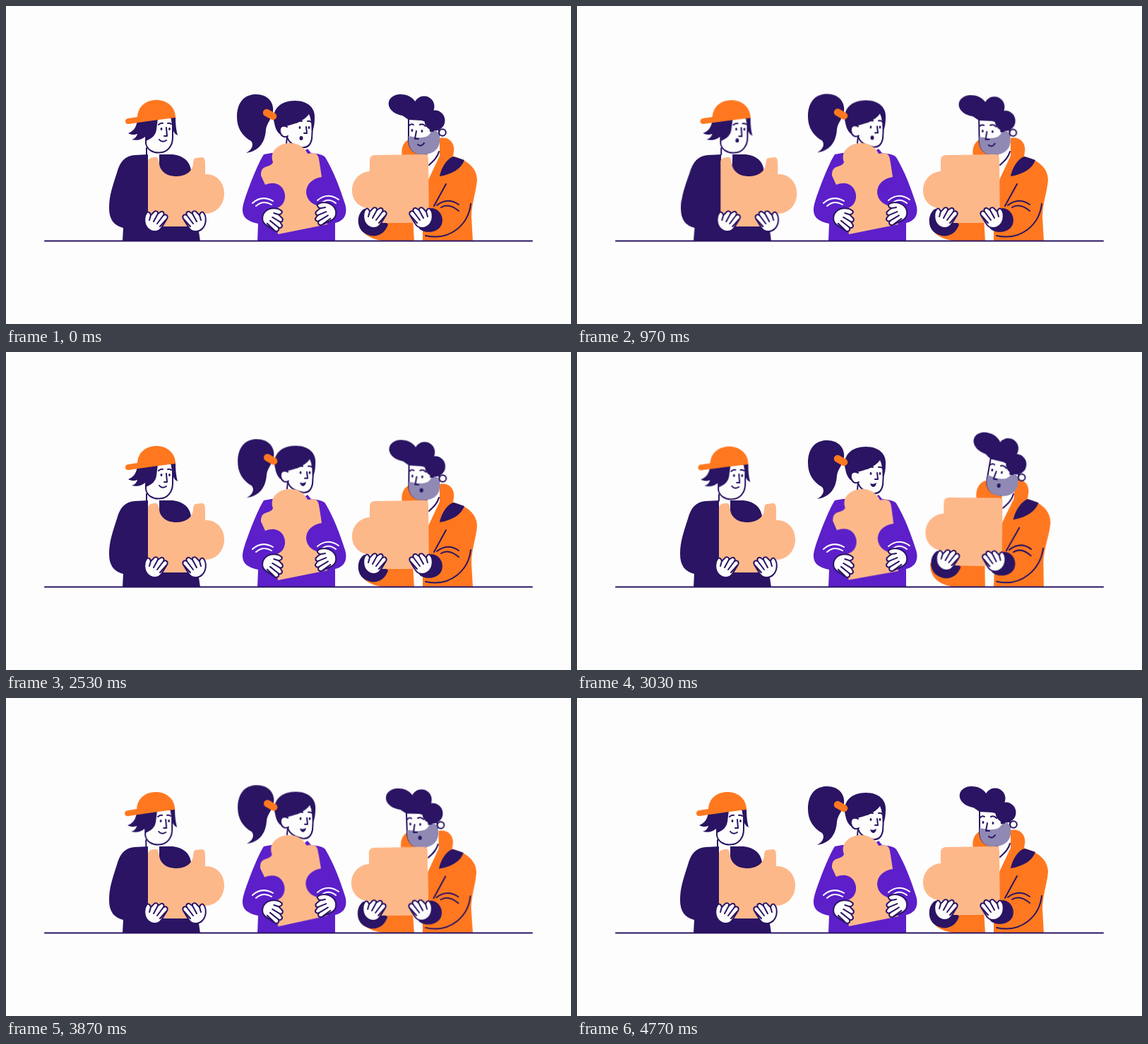
Write an HTML page that moves like this. It is 800 px wide and 450 px high and loops after 4810 ms.

```html
<!DOCTYPE html>
<html lang="en">
<head>
<meta charset="utf-8">
<title>Three people with puzzle pieces</title>
<style>
html, body { margin: 0; width: 100%; height: 100%; overflow: hidden; background: #fdfdfd; }
svg { display: block; width: 100vw; height: 100vh; }
.navy { fill: #2a1463; }
.orange { fill: #ff7820; }
.piece { fill: #fdb88a; }
.purple { fill: #5c1fca; }
.beard { fill: #8f89b4; }
.skin { fill: #fdfdfd; }
.ink, .edge { stroke: #2a1463; stroke-width: 2; stroke-linecap: round; stroke-linejoin: round; }
.ink { fill: none; }
.edge { fill: #fdfdfd; }
.fold { fill: none; stroke: #fdfdfd; stroke-width: 2; stroke-linecap: round; }

.anim { transform-box: view-box; animation: 4810ms ease-in-out infinite; }
.talk, .rest { animation: 4810ms step-end infinite; }

#boyBody { transform-origin: 220px 332px; animation-name: boyBody; }
#boyPiece { animation-name: boyPiece; }
#boyHead { transform-origin: 217px 208px; animation-name: boyHead; }
@keyframes boyBody {
  0%, 6%, 50%, 100% { transform: skewX(0deg); }
  15%, 24% { transform: skewX(-1.5deg); }
  38% { transform: skewX(-.8deg); }
}
@keyframes boyPiece {
  0%, 6%, 50%, 100% { transform: translate(0, 0); }
  15%, 24% { transform: translate(2.3px, 0); }
  38% { transform: translate(1.2px, 0); }
}
@keyframes boyHead {
  0%, 5%, 51%, 56%, 100% { transform: translate(0, 0) rotate(0deg); }
  14%, 24% { transform: translate(5.2px, .3px) rotate(.5deg); }
  38% { transform: translate(2.5px, .2px) rotate(.4deg); }
  61%, 66% { transform: translate(2px, .8px) rotate(.6deg); }
  80%, 84% { transform: translate(-.7px, 0) rotate(-.2deg); }
}

#girlHead { transform-origin: 405px 205px; animation-name: girlHead; }
#girlPiece { transform-origin: 405px 300px; animation-name: girlPiece; }
@keyframes girlHead {
  0%, 63%, 99%, 100% { transform: translate(0, 0) rotate(0deg); }
  8%, 13% { transform: translate(.3px, -2.5px) rotate(.2deg); }
  20%, 38% { transform: translate(0, -.6px) rotate(0deg); }
  52.6%, 80.5% { transform: translate(.9px, -1.4px) rotate(.3deg); }
  92% { transform: translate(.4px, -2px) rotate(.2deg); }
}
@keyframes girlPiece {
  0%, 52%, 99%, 100% { transform: rotate(0deg); }
  63%, 70% { transform: rotate(1.2deg); }
  80.5% { transform: rotate(-1deg); }
}

#manBody { transform-origin: 580px 332px; animation-name: manBody; }
#manPiece { transform-origin: 550px 260px; animation-name: manPiece; }
#manHead { transform-origin: 600px 205px; animation-name: manHead; }
@keyframes manBody {
  0%, 53%, 99%, 100% { transform: skewX(0deg) scaleY(1); }
  57.500%, 63% { transform: skewX(-2.2deg) scaleY(1.04); }
  69%, 75.500% { transform: skewX(-3.2deg) scaleY(1.045); }
  80.5% { transform: skewX(.6deg) scaleY(.992); }
  86%, 92% { transform: skewX(-1.1deg) scaleY(1.018); }
}
@keyframes manPiece {
  0%, 53%, 99%, 100% { transform: translate(0, 0) rotate(0deg); }
  57.500%, 63% { transform: translate(3.5px, -4.500px) rotate(1.3deg); }
  69%, 75.500% { transform: translate(4.8px, -5px) rotate(1.6deg); }
  80.5% { transform: translate(-1px, .8px) rotate(-.2deg); }
  86%, 92% { transform: translate(1.6px, -2px) rotate(.5deg); }
}
@keyframes manHead {
  0%, 4%, 99%, 100% { transform: translate(0, 0) rotate(0deg); }
  20% { transform: translate(-.2px, .6px) rotate(-.8deg); }
  38% { transform: translate(-.1px, .3px) rotate(-.5deg); }
  53% { transform: translate(.2px, -.2px) rotate(.5deg); }
  57.500%, 63% { transform: translate(7.5px, -5px) rotate(10deg); }
  69%, 75.500% { transform: translate(9px, -6px) rotate(11deg); }
  80.5% { transform: translate(-1.5px, 1.5px) rotate(-2deg); }
  86%, 92% { transform: translate(3px, -2.500px) rotate(4deg); }
}

#boyHead .talk { animation-name: boyTalk; }
#boyHead .rest { animation-name: boyRest; }
#girlHead .talk { animation-name: girlTalk; }
#girlHead .rest { animation-name: girlRest; }
#manHead .talk { animation-name: manTalk; }
#manHead .rest { animation-name: manRest; }
@keyframes boyTalk { 0%, 45% { opacity: 0; } 12% { opacity: 1; } }
@keyframes boyRest { 0%, 45% { opacity: 1; } 12% { opacity: 0; } }
@keyframes girlTalk { 0% { opacity: 1; } 30% { opacity: 0; } 99.6% { opacity: 1; } }
@keyframes girlRest { 0% { opacity: 0; } 30% { opacity: 1; } 99.6% { opacity: 0; } }
@keyframes manTalk { 0%, 93% { opacity: 0; } 49% { opacity: 1; } }
@keyframes manRest { 0%, 93% { opacity: 1; } 49% { opacity: 0; } }
</style>
</head>
<body>
<svg viewBox="0 0 800 450" preserveAspectRatio="none">
  <defs>
    <g id="hand">
      <path class="edge" d="M-12 11C-18 5 -18 -6 -14 -11C-12 -14 -9 -12 -8 -8L-4 -12C-2 -15 3 -14 2 -10L5 -12C8 -15 12 -12 10 -8C14 -10 17 -7 15 -3L7 10C2 17 -7 16 -12 11Z"/>
      <path class="ink" d="M-8 -8L-10 -1M2 -10L-4 1M10 -8L1 4M14 -2L5 8"/>
    </g>
    <clipPath id="above"><path d="M0 0H800V332H0Z"/></clipPath>
  </defs>

  <g clip-path="url(#above)">
    <!-- boy -->
    <g id="boyBody" class="anim">
      <path class="navy" d="M202 210L182 211C168 212 161 221 157 236C151 255 146 268 146 286C146 302 153 311 166 314L165 333H275L272 312L262 300V232C260 220 252 212 236 210Z"/>
      <path class="skin" d="M201 202H217V224H201Z"/>
    </g>
    <g id="boyHead" class="anim">
      <path class="edge" d="M198 178V194C199 203 208 208 217 207.500C229 207 236 198 236 186V158H200Z"/>
      <path class="ink" d="M199 201V210"/>
      <path class="navy" d="M186 161C185 171 181 177 173 180C178 183 183 182 186 181C185 185 182 188 178 189C186 191 192 189 197 185L198 191C206 188 212 183 213 175L215 159Z"/>
      <path class="navy" d="M233 156H240C240 168 241 176 243 183C238 181 236 176 235 168Z"/>
      <path class="orange" d="M173 159L186 157C187 142 198 133 213 133C228 133 240 143 240 158C222 160 200 163 174 167C168 168 167 160 173 159Z"/>
      <path class="ink" d="M216 168Q219 165 222 166M229 166Q232 165 234 167M227 172L228 184H224"/>
      <ellipse class="navy" cx="220" cy="174" rx="1.400" ry="1.900"/>
      <ellipse class="navy" cx="231.500" cy="174" rx="1.400" ry="1.900"/>
      <path class="ink rest" d="M217 189Q221 194 227 190"/>
      <ellipse class="navy talk" cx="221.500" cy="190" rx="2.500" ry="3"/>
    </g>
    <g id="boyPiece" class="anim">
      <path class="piece" d="M201 221C201 215 206 214 213 214C217 215 216 224 219 230C224 239 234 241 242 241C252 241 261 236 264 228C266 222 264 216 269 215L278 214C282 215 282 220 282 224V238C297 237 309 249 309 265C309 282 297 294 282 294V300C282 307 279 312 272 312H201Z"/>
      <use href="#hand" transform="translate(213 304)"/>
      <use href="#hand" transform="translate(266 304) scale(-1 1)"/>
    </g>

    <!-- girl -->
    <path class="purple" d="M376 208L365 210C357 222 344 255 337 277C331 296 338 304 357 308L356 333H466V307C480 304 484 293 480 280C473 258 464 234 452 214C447 209 438 209 432 208L427 202L421 206Z"/>
    <path class="skin" d="M391 186H424V204L414 212H392Z"/>
    <g id="girlHead" class="anim">
      <path class="navy" d="M352 125C370 124 380 136 378 150C376 160 369 166 368 175C367 191 360 205 340 208C349 203 351 196 347 191C334 184 327 172 327 157C327 138 336 126 352 125Z"/>
      <path class="edge" d="M392 166L430 150C434 162 434 178 433 188C431 198 426 201 419 200C408 198 400 193 398 185Z"/>
      <path class="ink" d="M398 184L397 195"/>
      <path class="navy" d="M380 166C375 145 390 134 409 134C428 134 438 145 437 158C437 166 436 172 434 177C434 167 432 160 429 153C422 163 408 167 397 170L392 181H387C383 177 381 172 380 166Z"/>
      <path class="edge" d="M398 171C391 168 387 171 388 178C389 184 394 187 399 184"/>
      <path d="M369 151L378 156" stroke="#ff7820" stroke-width="10.500" stroke-linecap="round"/>
      <path class="ink" d="M411 165Q415 162 419 163M427 163Q430 162 432 164M425 171L426 180H422"/>
      <ellipse class="navy" cx="416" cy="172" rx="1.400" ry="1.900"/>
      <ellipse class="navy" cx="429" cy="172" rx="1.400" ry="1.900"/>
      <ellipse class="navy talk" cx="418" cy="187" rx="2.500" ry="3"/>
      <path class="navy rest" d="M415 186Q420 188 424 185Q423 191 419 191Q416 190 415 186Z"/>
    </g>
    <g id="girlPiece" class="anim">
      <path class="piece" d="M367 228C372 226 377 225 378 221C372 204 388 194 402 194C416 194 424 202 427 209C433 208 437 208 440 210C443 213 443 217 444 222L447 242C434 244 425 252 425 264C426 276 436 284 450 283L455 309L385 323L379 287C390 286 396 277 395 267C393 254 382 247 367 253L361 240C361 234 362 230 367 228Z"/>
    </g>
    <path class="fold" d="M349 279Q362 267 378 276M354 283Q364 274 376 281M441 275Q455 263 471 274M445 280Q456 270 467 279"/>
    <use href="#hand" transform="translate(378 303) rotate(92)"/>
    <use href="#hand" transform="translate(452 295) scale(-1 1) rotate(84)"/>

    <!-- man -->
    <g id="manBody" class="anim">
      <path class="orange" d="M572 188C561 192 558 205 562 216H600V200Z"/>
      <path class="skin" d="M596 200H616V216L598 250V310H576V333H592V310L600 260Z"/>
      <path class="orange" d="M499 300C499 320 512 330 538 333H578L576 300Z"/>
      <path class="orange" d="M614 187C628 184 636 195 634 206L633 213C652 217 667 229 667 246C666 262 659 280 659 298L661 333H590V306H598V246L614 212Z"/>
      <path class="ink" d="M613 206C611 214 606 219 599 225"/>
      <path class="navy" d="M614 241C616 229 625 215 634 213L649 218C645 230 632 238 614 241Z"/>
      <path class="ink" d="M623 252L606 283M610 282Q625 270 641 281M616 285Q627 278 641 290M594 325C630 333 655 308 658 280"/>
    </g>
    <g id="manHead" class="anim">
      <circle class="edge" cx="618" cy="179" r="4.800"/>
      <path class="edge" d="M570 156V190C571 203 578 209 589 209C603 209 611 202 613 190V160Z"/>
      <path class="beard" d="M570 184L582 186C594 187 600 184 602 177H610C615 182 615 190 613 197C609 207 600 210 588 210C577 210 570 202 570 190Z"/>
      <g class="navy">
        <ellipse cx="561.500" cy="140" rx="20" ry="14.800" transform="rotate(12 561.500 140)"/>
        <circle cx="592" cy="142" r="14.500"/>
        <circle cx="607" cy="162" r="14.500"/>
        <path d="M554 150L598 134L612 170L605 178H600C600 170 596 163 588 162L570 161Z"/>
      </g>
      <path class="ink" d="M571 169Q574 166 577 168M586 168Q590 166 594 170M581 177L579 188H584"/>
      <ellipse class="navy" cx="575" cy="176" rx="1.400" ry="1.900"/>
      <ellipse class="navy" cx="589" cy="177" rx="1.400" ry="1.900"/>
      <path class="ink rest" d="M583 196Q588 200 592 194"/>
      <ellipse class="navy talk" cx="588" cy="196" rx="2.600" ry="3"/>
    </g>
    <g id="manPiece" class="anim">
      <path class="navy" d="M507 287C496 294 496 314 507 321C520 330 536 325 541 309L520 290ZM602 286C616 287 621 301 616 311C611 320 596 323 586 316L580 306Z"/>
      <path class="piece" d="M515 234V219C515 213 518 211 523 211L593 210C597 210 598 213 598 218L599 307H519V287C501 287 490 276 490 261C490 246 501 235 515 234Z"/>
      <use href="#hand" transform="translate(523 299)"/>
      <use href="#hand" transform="translate(587 299) scale(-1 1)"/>
    </g>
  </g>
  <path class="ink" d="M55 332.500H745"/>
</svg>
</body>
</html>
```
